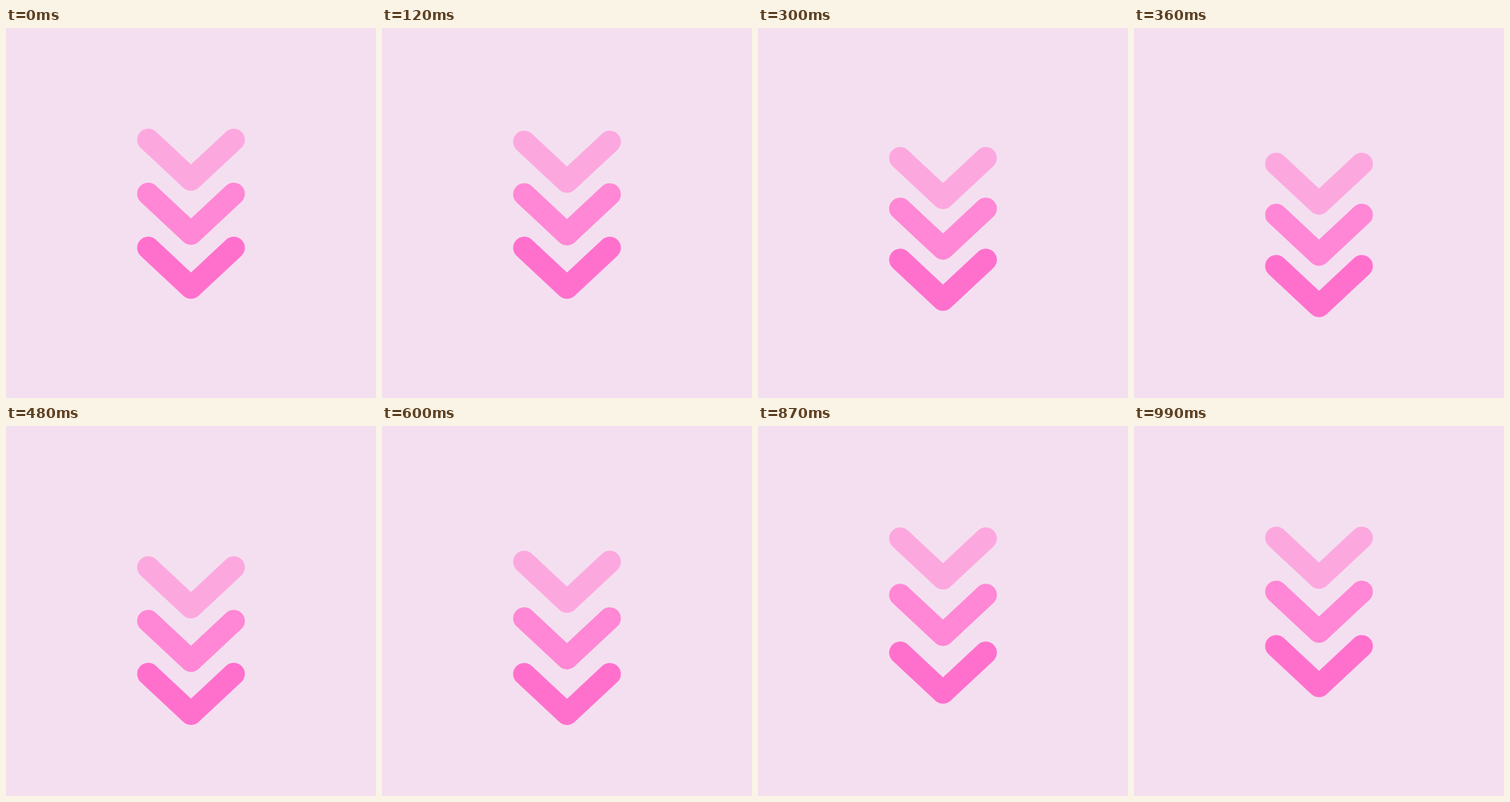
An HTML page with a canvas for the animation above (1020 ms loop, 500x500 px).

```html
<!DOCTYPE html>
<html lang="en">
<head>
<meta charset="utf-8">
<title>Scroll down</title>
<style>
  html, body { margin: 0; width: 100%; height: 100%; overflow: hidden; background: #f4dff0; }
  canvas { display: block; width: 500px; height: 500px; }
</style>
</head>
<body>
<canvas id="stage" width="500" height="500"></canvas>
<script>
const ctx = document.getElementById('stage').getContext('2d');
const LOOP = 1020, STEP = 30, DROP = 40;

// Each chevron leaves its rest height, reaches the bottom, then returns.
const chevrons = [
  { y: 151, color: '#fca8df', start: 50, peak: 480, end: 912 },
  { y: 224, color: '#ff87d5', start: 87, peak: 511, end: 960 },
  { y: 297, color: '#ff70cd', start: 116, peak: 537, end: 1021 }
];

function ease(from, to, t) {
  const s = Math.min(1, Math.max(0, (t - from) / (to - from)));
  return s * s * (3 - 2 * s);
}

function drawChevron({ y, color, start, peak, end }, t) {
  const top = y + DROP * (ease(start, peak, t) - ease(peak, end, t));
  ctx.strokeStyle = color;
  ctx.beginPath();
  ctx.moveTo(192.2, top);
  ctx.lineTo(250, top + 54);
  ctx.lineTo(307.8, top);
  ctx.stroke();
}

function draw(now) {
  const t = Math.floor((now % LOOP) / STEP) * STEP;
  ctx.fillStyle = '#f4dff0';
  ctx.fillRect(0, 0, 500, 500);
  ctx.lineWidth = 30;
  ctx.lineCap = ctx.lineJoin = 'round';
  for (const c of chevrons) drawChevron(c, t);
}

const origin = performance.now();
function tick() {
  draw(performance.now() - origin);
  requestAnimationFrame(tick);
}
tick();
</script>
</body>
</html>
```
